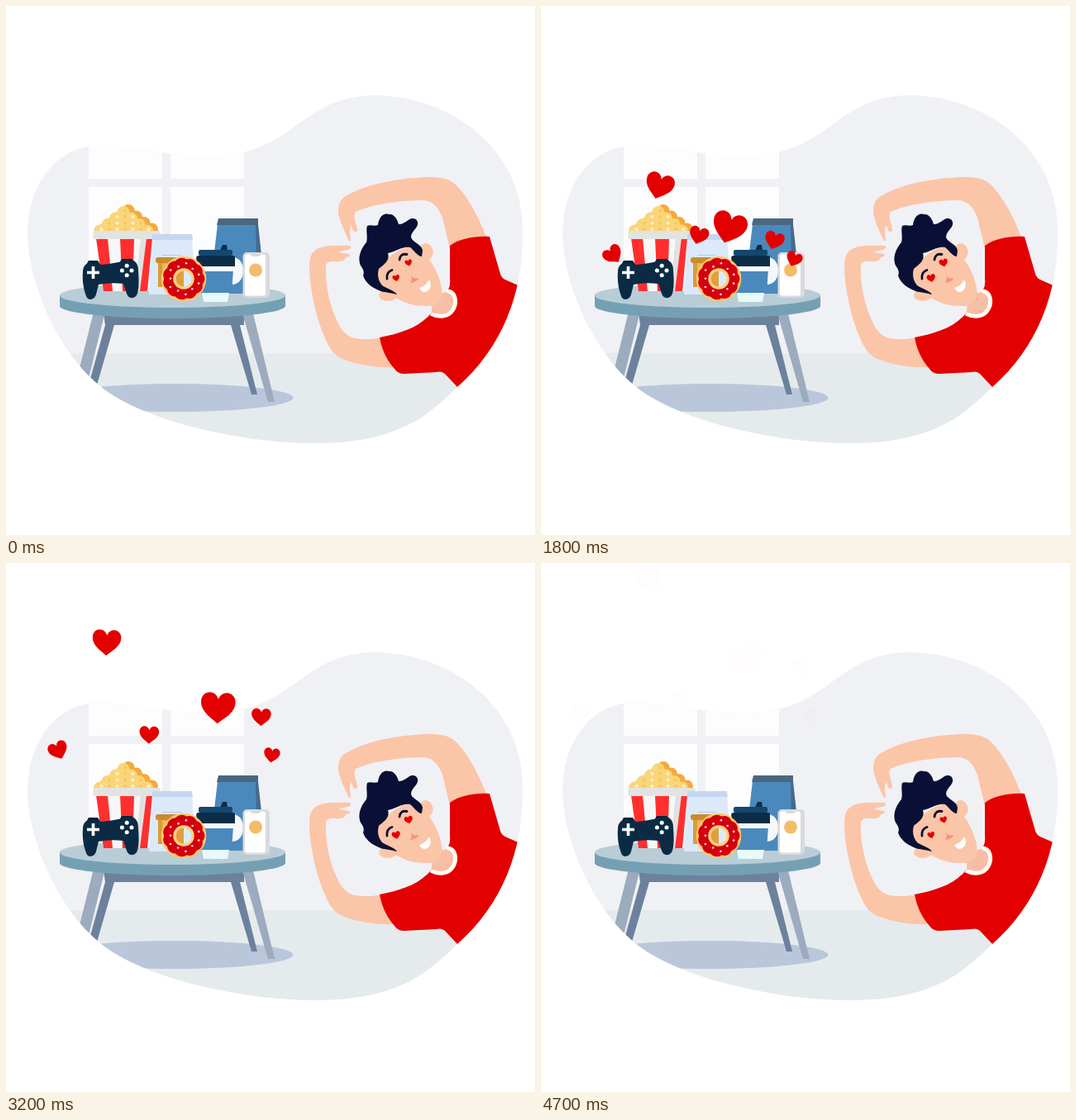
An HTML page that plays this animation: 640 by 640 pixels, repeating every 4800 ms.

```html
<!DOCTYPE html>
<html>
<head>
<meta charset="utf-8">
<style>
html, body { margin: 0; width: 100%; height: 100%; overflow: hidden; background: #fff }
svg { display: block; width: 100vw; height: 100vh }
</style>
</head>
<body>
<svg viewBox="0 0 640 640">
<defs>
  <path id="blob" d="M26 276C26 215 62 169 112 169C160 170 200 182 247 181C290 181 315 170 345 149C375 127 400 108 448 108C545 110 625 178 625 270C627 342 603 411 546 461C515 490 480 529 374 529C290 529 180 505 125 468C62 425 26 330 26 276Z"/>
  <clipPath id="room"><use href="#blob"/></clipPath>
  <path id="heart" fill="#e30000" d="M0 .97C-.35 .67-1 .32-1-.28C-1-.63-.75-.83-.5-.83C-.25-.83-.08-.68 0-.43C.08-.68 .25-.83 .5-.83C.75-.83 1-.63 1-.28C1 .32 .35 .67 0 .97Z"/>
</defs>

<use href="#blob" fill="#f0f1f5"/>
<g clip-path="url(#room)">
  <path fill="#e5ebed" d="M0 420H640V540H0Z"/>
  <path fill="#fdfdfd" d="M100 150H189V209H100ZM199 150H288V209H199ZM100 219H189V345H100ZM199 219H288V345H199Z"/>
  <ellipse cx="204" cy="474" rx="143.500" ry="17" fill="#bac7db"/>
  <!-- table -->
  <path fill="#6c819c" d="M118 372H288V386H283L304 470H297L272 386H131L109 462H99L120 386Z"/>
  <path fill="#9cabbe" d="M106 370H120L97 462H83ZM286 372H299L325 479H317Z"/>
</g>
<path fill="#75a0b4" d="M65 349V363C65 371 126 378 201 378S338 371 338 363V349Z"/>
<ellipse cx="201.500" cy="350" rx="136.500" ry="15" fill="#b9cdd6"/>

<!-- tall bag -->
<path fill="#456a8d" d="M300 264H305L310 310V348H300Z"/>
<path fill="#4b89bc" d="M256 264H302L304 348H246Z"/>
<path fill="#4a6782" d="M257 257H305V265H255Z"/>

<!-- popcorn -->
<g id="corn"></g>
<path fill="#f7f7f7" d="M109 281H183L174 345H118Z"/>
<path fill="#e1e1e1" d="M163 281H171L164 345H156Z"/>
<path fill="#ff2f2f" d="M109 281H123L129 345H118ZM138 281H155L153 345H141ZM170 281H177L171 345H162Z"/>
<rect x="105.500" y="272" width="81" height="10" rx="1.500" fill="#e3e3e3"/>

<!-- biscuit pouch -->
<path fill="#dce9fb" d="M178 280H225L230 349H173Z"/>
<path fill="#c5d7ee" d="M177 276H225L226 283H177Z"/>
<path fill="#b9cbe4" d="M189 301H212V302H189Z"/>
<path fill="#d99c38" d="M184 309H214V340H184Z"/>
<rect x="181" y="304" width="34" height="7" rx="3" fill="#c98c2c"/>
<path fill="#edb650" d="M189 311H194V340H189Z"/>

<!-- mug -->
<path fill="#f5f7fa" d="M273 304C292 303 292 337 273 337Z"/>
<path fill="#4b89bc" d="M233 318H275L273 348H236Z"/>
<path fill="#f7fafc" d="M233 315H275V321H233Z"/>
<path fill="#e6fafa" d="M237 347H270L268 358H239Z"/>
<path fill="#0c2c47" d="M259 296L262 289H267L268 296ZM232 302H275Q277 302 277 305V315H233Q230 309 230 304Z"/>
<rect x="233" y="295" width="41" height="7" rx="2" fill="#14476f"/>

<!-- doughnut -->
<g transform="translate(215 330)">
  <circle r="19" fill="none" stroke="#fdc86b" stroke-width="16.500"/>
  <path id="icing" fill="none" stroke="#d3000f" stroke-width="12"/>
  <circle r="11" fill="none" stroke="#fbd07f" stroke-width="3.500"/>
  <path fill="#dfa03c" d="M0-9.300A9.300 9.300 0 0 0 0 9.300Z"/>
  <path fill="#dcebfb" d="M0-9.300A9.300 9.300 0 0 1 0 9.300Z"/>
  <g id="dots"></g>
</g>

<!-- phone -->
<rect x="286.500" y="298" width="32.500" height="55" rx="5" fill="#d9dade"/>
<rect x="289" y="300.500" width="25" height="50" rx="3" fill="#fff"/>
<path fill="#d9dade" d="M296 300H308Q308 303 305 303H299Q296 303 296 300Z"/>
<circle cx="302" cy="319.500" r="8" fill="#f3bd68"/>

<!-- gamepad -->
<path fill="#08233a" d="M97 313L100 308H111L115 314ZM137 311L140 306H152L156 310Z"/>
<path fill="#0b2b45" d="M93 322C93 314 97 311 103 311L116 313Q126 312 136 310L149 307C156 307 160 311 160 320C161 333 161 345 158 350C154 355 148 354 146 348L142 336Q126 334 112 337L109 349C107 356 99 357 97 351C94 343 92 332 93 322Z"/>
<path stroke="#fff" stroke-width="3.600" d="M98 322.500H113M105.500 315V330"/>
<g id="buttons"></g>

<!-- man -->
<g fill="#fbc5a8">
  <path d="M582 282C573 258 560 232 545 217C537 209 527 207 512 207C478 208 440 214 413 229C404 233 402 240 402 250C403 258 409 272 414 282Q417 288 417 282C416 275 415 270 418 265L420 272Q425 275 425 270C424 262 419 255 423 249C445 239 480 235 505 235C518 236 523 244 528 256L537 294Z"/>
  <path d="M472 437C445 438 425 434 407 427C395 422 390 412 384 397C375 375 367 340 367 315C367 302 371 295 381 292C392 289 405 290 416 290Q419 293 413 295C409 296 405 296 403 298L415 300Q418 303 411 304Q411 310 398 309Q390 308 387 313C386 340 392 362 400 380C405 392 412 400 422 402C432 404 445 403 457 401Z"/>
</g>
<g clip-path="url(#room)">
  <path fill="#e30000" d="M537 290C549 281 568 278 585 279L598 324Q599 329 606 332L640 347L610 440L546 461L532 446Q528 441 520 443L482 445Q474 445 470 439C459 427 454 412 452 401C475 397 500 389 513 373L535 343Q538 338 537 330Z"/>
</g>
<path fill="#f8bda6" stroke="#fffaf2" stroke-width="5" d="M533 345C544 345 546 358 541 367C535 377 523 377 514 372"/>
<path fill="#f8bda6" d="M516 350L533 346L540 358L530 372L515 371Z"/>
<g fill="#fbc5a8">
  <ellipse cx="508.500" cy="297" rx="8" ry="10" transform="rotate(-15 508 297)"/>
  <ellipse cx="462" cy="350" rx="11" ry="7"/>
  <path d="M449 322C462 300 480 290 498 291L507 300C517 312 524 325 527 341C530 356 522 364 508 363C495 363 482 360 470 352L452 338Z"/>
</g>
<path fill="#0a1035" d="M472 349C464 346 457 347 451 344C441 340 434 333 432 326C434 322 432 318 429 314C425 305 429 294 436 286C438 279 435 272 437 266C441 264 446 267 450 265C451 255 457 250 463 252C469 251 473 257 475 264C481 265 486 258 491 257C497 256 500 262 497 267C493 273 488 277 491 282C495 287 503 289 504 296L503 303C498 303 493 295 489 292C480 290 472 297 462 299C465 308 457 313 451 318C449 325 450 332 455 338C461 342 470 344 473 349Z"/>
<path fill="none" stroke="#0a1035" stroke-width="2.800" stroke-linecap="round" d="M461 330Q460 322 467 319.500M476 307Q477 299 485 300.500"/>
<path fill="#f4917f" d="M490 325Q492 331 499 329Q499 333 489 335Q492 331 490 325Z"/>
<path fill="#fff" d="M500 341Q508 339 512 331Q516 339 511 344Q504 349 500 341Z"/>
<g id="eyes"></g>
<g id="hearts"></g>
</svg>
<script>
const LOOP = 4800, STEP = 100;
const {PI, sin, cos, min, max, sign, floor} = Math;
const $ = id => document.getElementById(id);
const ease = v => (1 - cos(PI * min(1, max(0, v)))) / 2;

function add(parent, tag, attrs) {
  const el = document.createElementNS('http://www.w3.org/2000/svg', tag);
  for (const k in attrs) el.setAttribute(k, attrs[k]);
  return $(parent).appendChild(el);
}
const dot = (parent, cx, cy, r, fill) => add(parent, 'circle', {cx, cy, r, fill});
const heart = parent => add(parent, 'use', {href: '#heart'});
const place = (el, x, y, tilt, size) =>
  el.setAttribute('transform', `translate(${x} ${y}) rotate(${tilt}) scale(${size})`);

// popcorn: shrinking rows of puffs, an orange pile behind a yellow one
function pile(cx, base, puff) {
  for (let row = 0; row < 4; row++) {
    const n = 7 - 2 * row;
    for (let i = 0; i < n; i++) puff(cx + (i - (n - 1) / 2) * 9.5, base - 7.5 * row, i + row);
  }
}
pile(148, 270, (x, y) => dot('corn', x, y, 7.5, '#f5a93a'));
pile(142, 272, (x, y) => dot('corn', x, y, 7.5, '#fad67a'));
pile(144, 270, (x, y, i) => dot('corn', x, y, 2, i % 2 ? '#f6c861' : '#fff0c4'));

// scalloped icing and its sprinkles
let ring = '';
for (let a = 0; a < 2 * PI; a += PI / 60) {
  const r = 18.5 + .9 * cos(11 * a);
  ring += (a ? 'L' : 'M') + r * cos(a) + ' ' + r * sin(a);
}
$('icing').setAttribute('d', ring + 'Z');
for (let i = 0; i < 11; i++) {
  const a = i * PI / 5.5 + .3, r = 17.5 + 1.5 * cos(i * PI);
  dot('dots', r * cos(a), r * sin(a), 1.3, '#ffd9d2');
}

for (let a = 0; a < 2 * PI; a += PI / 2)
  dot('buttons', 146.2 + 5.8 * cos(a), 320 + 5.8 * sin(a), 2.5, '#fff');

// a heart climbs by rise and drifts sideways, swaying and tilting on the way
function floater(x, y, size, rise, drift, sway, lean = 18) {
  const el = heart('hearts'), side = sign(lean), curl = 4 * side - .4 * sway;
  return p => place(el,
    x + drift * p + sway * sin(PI * p) + curl * sin(2 * PI * p),
    y - rise * p,
    lean - side * 110 * (p - .33) ** 2, size);
}
const floaters = [
  floater(145, 278, 17.3, 260, -14, -8),
  floater(106, 338, 11.8, 159, -58, -5, -38),
  floater(209, 314, 20.8, 199, 41, 19),
  floater(192, 312, 11.8, 149, -23, 1),
  floater(263, 332, 11.8, 208, 52, 11),
  floater(292, 343, 9.7, 158, 34, 8, 24)
];
const eyes = [heart('eyes'), heart('eyes')];

function draw(t) {
  const p = ease((t - 350) / 4500);
  floaters.forEach(move => move(p));
  $('hearts').setAttribute('opacity', min(ease(t / 500), ease((4735 - t) / 500)));
  const beat = 4.3 + 1.1 * sin(PI * t / LOOP) ** 2;
  eyes.forEach((el, i) => place(el, 472 + 15 * i, 329 - 18.5 * i, -14, beat));
}

const start = performance.now();
function tick() {
  const t = (performance.now() - start) % LOOP;
  draw(floor(t / STEP) * STEP);
  requestAnimationFrame(tick);
}
tick();
</script>
</body>
</html>
```
